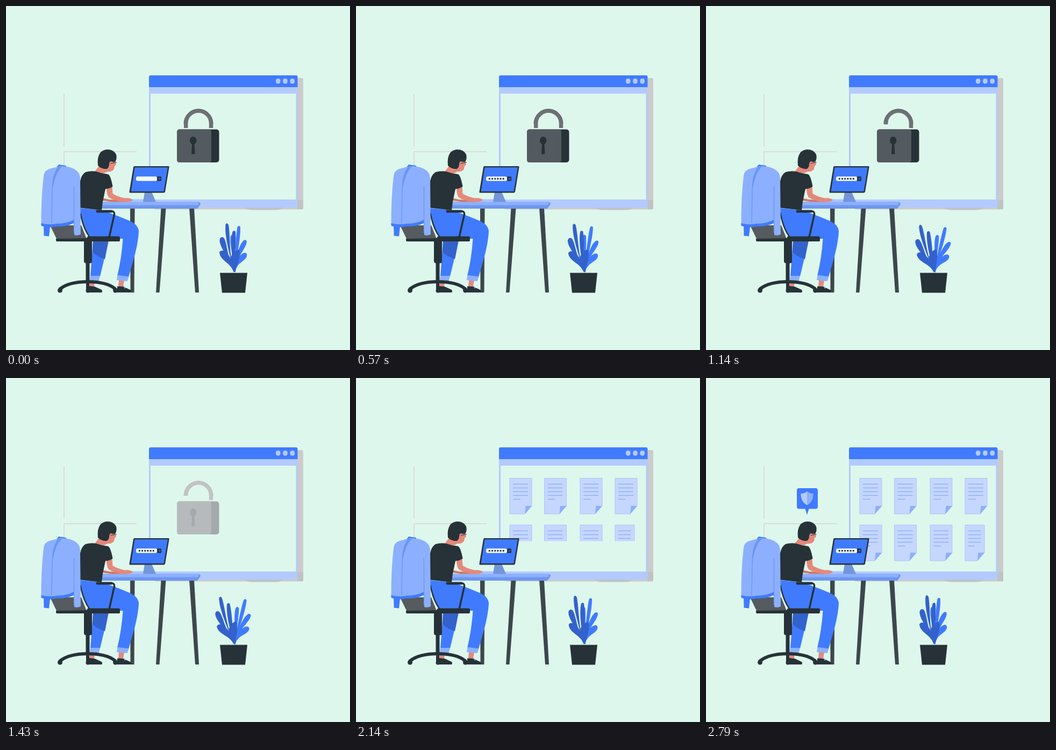
An HTML page for the animation above (2870 ms loop, 640x640 px).

```html
<!DOCTYPE html>
<html lang="en">
<head>
<meta charset="utf-8">
<title>Secure sign-in</title>
<style>
  html, body { margin: 0; height: 100%; overflow: hidden; background: #def7ec; }
  svg { display: block; width: 100vw; height: 100vh; }
  .blue { fill: #407bff; }
  .deep { fill: #3362cc; }
  .pale { fill: #b3caff; }
  .soft { fill: #8cb0ff; }
  .dark { fill: #263238; }
  .skin { fill: #e4897b; }
  .line { fill: none; stroke: #263238; stroke-linecap: round; stroke-linejoin: round; }
  .shackle { fill: none; stroke-width: 7.5; }
</style>
</head>
<body>
<svg viewBox="0 0 640 640">
  <defs>
    <clipPath id="reveal"><rect id="revealBox" x="280" y="185" width="250" height="0"/></clipPath>
  </defs>

  <!-- wall lines -->
  <path d="M108 164V262M108 298V271H243" fill="none" stroke="#d8d5d4" stroke-width="1.5"/>

  <!-- browser window -->
  <g>
    <rect x="276" y="134" width="277" height="244.500" rx="3" fill="#cacccb"/>
    <path d="M542 361H553V376Q553 378 550 378H542Z" fill="#c0c2c2"/>
    <path d="M443 375H517Q511 379.500 503 379.500H457Q448 379.500 443 375Z" fill="#bfc3c9"/>
    <rect class="pale" x="266" y="140" width="276.500" height="235" rx="2"/>
    <path class="blue" d="M266 151V132Q266 129 269 129H539.500Q542.500 129 542.500 132V151Z"/>
    <rect x="269" y="163" width="270.500" height="197" fill="#def7ec"/>
    <g class="pale">
      <rect x="502" y="135" width="8.500" height="9.500" rx="4"/>
      <rect x="515.200" y="135" width="8.500" height="9.500" rx="4"/>
      <rect x="528.500" y="135" width="8.500" height="9.500" rx="4"/>
    </g>
  </g>

  <g id="cards" clip-path="url(#reveal)"></g>

  <!-- padlock fades over a white silhouette -->
  <g id="padlock">
    <path class="shackle" stroke="#fff"/>
    <rect x="318" y="229.500" width="78.500" height="61.500" rx="5" fill="#fff"/>
    <g id="lockColor">
      <path class="shackle" stroke="#6d7175"/>
      <path d="M331 219A27 27 0 0 1 385 219" fill="none" stroke="#5c6266"/>
      <rect class="dark" x="318" y="229.500" width="78.500" height="61.500" rx="5"/>
      <path d="M323 229.500H378Q382 229.500 382 234V286Q382 291 378 291H323Q318 291 318 286V234.500Q318 229.500 323 229.500Z" fill="#535b60"/>
      <path class="dark" d="M346 257L345 275.500H351.500L350.500 257A6.200 7.300 0 1 0 346 257Z"/>
    </g>
  </g>

  <!-- desk -->
  <g fill="#3c474c">
    <path d="M231 376H239.500L238.500 533H231.500Z"/>
    <path d="M205 528.500H238V533H205Z"/>
    <path d="M288.500 376H297.500L285.500 533H279Z"/>
    <path d="M341 376H350L359 533H352Z"/>
  </g>
  <path d="M178 365H360Q363 367 361 370L356 377H178Z" fill="#6f97ee"/>
  <path class="soft" d="M178 364H359L357 370.500H178Z"/>
  <path d="M199 363L213 359.500H261Q264 362 261 364.500H199Z" fill="#a9c3ff"/>

  <!-- monitor -->
  <path d="M258 346H271L279 364.500H255Z" fill="#7395da"/>
  <path class="dark" d="M239 298H302Q304 298 303.500 300L296 345.500Q295.500 347.500 293.500 347.500H231Q229 347.500 229.500 345.500L237 300Q237.300 298 239 298Z"/>
  <path class="blue" d="M239.500 300.300H301L293.500 345H232.500Z"/>
  <rect x="242" y="317.300" width="39" height="8.300" rx="3" fill="#f4f9ff"/>
  <rect class="dark" x="281" y="317.300" width="8" height="8.300" rx="1.500"/>
  <path d="M283 321.500H287M285.500 319.700L287.200 321.500L285.500 323.300" fill="none" stroke="#407bff"/>
  <g id="dots" class="dark"></g>

  <!-- far leg, chair stand -->
  <path class="blue" d="M162 436H191L175 503H157Z"/>
  <path class="deep" d="M162 436H191L184 471Q172 468 161 458Z"/>
  <path class="soft" d="M157 502H175L172.500 512H155.500Z"/>
  <path class="skin" d="M156 511.500H165L164 522H155Z"/>
  <path class="dark" d="M155 521L165 522L178 528Q180 531 178 533H152Z"/>
  <path class="dark" d="M145 436H160V475Q160 478.500 157 478.500H155.500V515H148.500V478.500Q145 478 145 475Z"/>
  <path class="dark" d="M149 512H155V531H149Z"/>
  <path class="line" stroke-width="6" d="M101 526Q118 513 152 513Q187 513 203 526"/>
  <g class="dark">
    <circle cx="100.500" cy="529" r="4.500"/>
    <circle cx="152.500" cy="529.500" r="4"/>
    <circle cx="203.500" cy="529" r="4.500"/>
  </g>

  <!-- near leg and foot -->
  <path class="skin" d="M210 510H220L218 522H209Z"/>
  <path class="dark" d="M207 521.500L218 522L231 528Q234 531 232 532.500H207Z"/>
  <path class="soft" d="M218 520L223 524L221 526Z"/>
  <path class="blue" d="M138 376L178 380Q200 387 226 398Q247 406 247 420Q246 438 240 462L228 504L207 502Q215 470 217.500 433L160 432Q144 418 138 384Z"/>
  <path class="soft" d="M207.500 500.500L228.500 503.500L225.500 512L206 510Z"/>

  <!-- chair seat and arm -->
  <path d="M82 408H140L150 433H94Z" fill="#555b5f"/>
  <path class="dark" d="M93 433L150 432L152 428.500H209Q212 428.500 212 431V436Q212 438 209 438H95Q93 438 93 436Z"/>
  <path class="line" stroke-width="2.500" d="M138.500 386Q144 415 156 430"/>
  <path class="line" stroke-width="3.500" d="M192 430L201.500 388Q202 382 197 382H176"/>

  <!-- person -->
  <path d="M178 357L192 360L218 362V364.500H198L178 362Z" fill="#cf7568"/>
  <path class="skin" d="M187 338L197.500 336L198.500 349Q208 355 221 357.500Q232 356.500 236 361Q234 364.500 219 365Q199 362 191 356Q187 350 187 338Z"/>
  <path class="skin" d="M173 298L165 308Q176 314 185 310L189 308Q198 309 201 303L202 298L205 295L203 287L193 285Z"/>
  <path class="dark" d="M171 297Q169 281 176 272Q182 267 189 267Q200 267 205 276Q207 284 203 290L198 290Q193 287 192 294Q192 300 188 303Q178 304 171 297Z"/>
  <path class="line" stroke-width="1" d="M195 293L203 291L205.500 291"/>
  <path class="dark" d="M148 309Q158 306 168 308Q179 312 190 313Q195 316 198.500 336Q192 340 185 340.500L180 364L178 380L138 375.500V326Q140 314 148 309Z"/>
  <path class="line" stroke-width="5" d="M170 382H196"/>

  <!-- jacket -->
  <path class="blue" d="M93 301L98 295L112 297V304ZM70 408L82 410L80 428.500L70.500 427.500Z"/>
  <path class="soft" d="M70 316Q71 306 81 303L100 298Q120 297 131 306Q137 310 138 320L139 425Q133 428 127 426L126 402Q112 410 94 409Q78 412 65.500 407Q65 360 70 316Z"/>
  <path class="blue" d="M65.500 404Q78 408 94 405Q113 405 126 398V404Q112 411 94 410Q80 414 65.500 409Z"/>
  <path d="M104 299Q90 312 86 346Q84 316 97 299Z" fill="#6a95f4"/>
  <path d="M86 340L85 404M126.500 335V422" fill="none" stroke="#6a95f4" stroke-width="1.300"/>

  <!-- plant -->
  <g id="rightLeaves" class="blue">
    <path d="M424 495C424 470 415 440 418 428Q421 423 424 428C426 445 425 470 426 495Z"/>
    <path d="M424 495C426 470 427 430 430.500 411Q433.500 407 436 411C437 435 428 465 427 495Z"/>
    <path d="M424 495C427 468 434 442 443 435.500Q449 434 447.500 441C444 455 430 464 426 495Z"/>
    <path d="M424 495C426 475 435 460 445 459Q450 461 447.500 467C442 477 431 476 426 495Z"/>
  </g>
  <g id="leftLeaves" class="deep">
    <path d="M424 495C417 465 406 428 408.500 406.500Q411 402 414 407C418 430 414 465 426 495Z"/>
    <path d="M424 495C417 468 396 450 397.500 434Q400 428 405 431C412 440 410 465 426 495Z"/>
    <path d="M424 495C417 476 398 474 397 458Q400 453 407 456C417 463 423 480 426 495Z"/>
    <path d="M424 495C421 470 417 440 421.500 420Q424.500 416 427 420C429 445 424 470 426 495Z"/>
    <path d="M424 495C412 472 418 458 434 453C437 466 431 480 426 495Z"/>
  </g>
  <path class="dark" d="M398 496.500H449L445 533.500H402Z"/>

  <!-- speech bubble -->
  <g id="bubble">
    <path class="blue" d="M173 205H204Q208 205 208 209V239.500Q208 243.500 204 243.500H191.500L188 254.500L184.500 243.500H173Q169 243.500 169 239.500V209Q169 205 173 205Z"/>
    <path class="soft" d="M188 211Q193 215 199.500 215Q200 230 188 236.500Z"/>
    <path class="pale" d="M188 211Q183 215 176.500 215Q176 230 188 236.500Z"/>
  </g>
</svg>
<script>
const $ = id => document.getElementById(id);
const LOOP = 2870, STEP = 1000 / 14, LAST = 39;
const ramp = (t, from, to) => Math.min(1, Math.max(0, (t - from) / (to - from)));
const ease = p => p * p * (3 - 2 * p);

function card(x, y, w) {
  const right = x + w, bottom = y + 66.5;
  const rules = [0, 1, 2, 3, 4].map(i =>
    `M${x + 6} ${y + 11 + 7 * i}h${(w - 13) * (i < 4 ? 1 : 0.5)}`).join('');
  return `<path d="M${x} ${y}H${right}V${bottom - 15}L${right - 13} ${bottom}H${x}Z" fill="#c6d7ff" stroke="#a9c3ff"/>
    <path class="soft" d="M${right - 13} ${bottom}L${right - 11.5} ${bottom - 15}H${right}Z"/>
    <path d="${rules}" stroke="#8cb0ff" stroke-width="1.4"/>`;
}

$('cards').innerHTML = [186.5, 273.5].map((y, row) =>
  [286, 350.5, 417, 482].map((x, col) => card(x, y, row && col === 3 ? 36 : 41)).join('')).join('');
$('dots').innerHTML = [0, 1, 2, 3, 4, 5].map(i =>
  `<circle cx="${248.3 + 5.2 * i}" cy="321.400" r="1.700"/>`).join('');
const dots = [...$('dots').children];
const shackles = document.querySelectorAll('.shackle');

function draw(t) {
  dots.forEach((dot, i) => dot.setAttribute('visibility', t >= 90 * (i + 1) ? 'visible' : 'hidden'));

  const foot = 227 - 8 * ease(ramp(t, 980, 1200));
  shackles.forEach(s => s.setAttribute('d', `M334.700 ${foot}V218.500A23.400 23.400 0 0 1 381.500 218.500V227`));
  const fade = ramp(t, 1210, 1585);
  $('lockColor').setAttribute('opacity', 1 - fade);
  $('padlock').setAttribute('visibility', fade < 1 ? 'visible' : 'hidden');

  $('revealBox').setAttribute('height', 157 * ramp(t, 1630, 2310));

  const sway = 4.15 * (1 - Math.cos(2 * Math.PI * ramp(t, 0, 2580)));
  $('leftLeaves').setAttribute('transform', `rotate(${-sway} 424 495)`);
  $('rightLeaves').setAttribute('transform', `rotate(${sway} 424 495)`);

  const pop = ease(ramp(t, 2450, 2700));
  $('bubble').setAttribute('transform', `translate(188 254) scale(${pop}) translate(-188 -254)`);
}

function tick() {
  const t = performance.now() % LOOP;
  draw(Math.min(LAST, Math.floor((t + 5) / STEP)) * STEP);
  requestAnimationFrame(tick);
}
tick();
</script>
</body>
</html>
```
